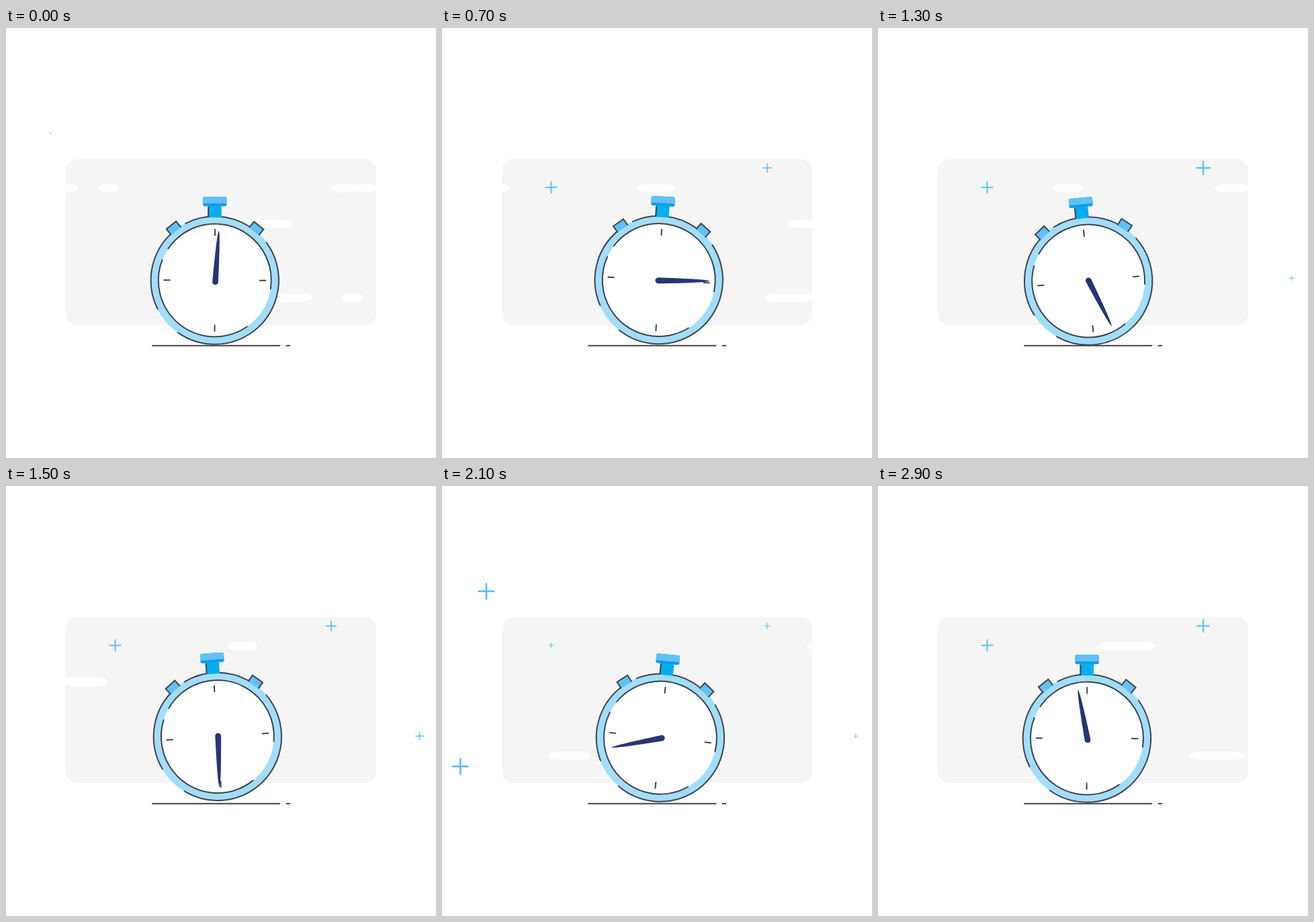
An HTML page with a canvas for the animation above (3000 ms loop, 640 px wide and 640 px high).

```html
<!DOCTYPE html>
<html lang="en">
<head>
<meta charset="utf-8">
<title>Stopwatch</title>
<style>
html, body { margin: 0; width: 100%; height: 100%; overflow: hidden; background: #fff; }
canvas { display: block; width: 640px; height: 640px; }
</style>
</head>
<body>
<canvas id="stage" width="640" height="640"></canvas>
<script>
const ctx = document.getElementById('stage').getContext('2d');
const LOOP = 3000, STEP = 100;
const INK = '#414347', SKY = '#61c0fb', PALE = '#a1ddfe', CYAN = '#04aeef', BLUE = '#0c9de8', NAVY = '#263576';
const RAD = Math.PI / 180;

// Rises smoothly from 0 to 1 between two times
function ease(t, from, to) {
  const u = Math.min(1, Math.max(0, (t - from) / (to - from)));
  return (1 - Math.cos(Math.PI * u)) / 2;
}

// The watch rocks from side to side, hops once, then settles
const SWING = 1720, SETTLE = SWING * 1.25;
function pose(t) {
  const tilt = 0.2 + 5.6 * (t < SETTLE ? Math.sin(2 * Math.PI * t / SWING) : 1 - ease(t, SETTLE, 2950));
  const drift = 8.5 * (ease(t, 0, 400) - ease(t, 1950, 2950));
  const hop = 34.6 * ease(250 - Math.abs(t - 1700), 0, 250);
  return { tilt, x: 310.6 + drift + 1.1 * tilt, y: 375.6 - 0.17 * tilt - hop, hand: 3.8 + 0.119 * t };
}

// Each twinkle swells and shrinks once per life, coming back after `every` ms
const pluses = [
  { x: 66, y: 156.7, start: -35, life: 720, every: 1845, swell: 13 },
  { x: 27.4, y: 417.3, start: 1675, life: 720, swell: 13 },
  { x: 484, y: 208.3, start: 385, life: 1500, every: 1500, swell: 11.5 },
  { x: 615.8, y: 372.3, start: 1060, life: 1250, swell: 7.5 },
  { x: 162.5, y: 237.2, start: 320, life: 1650, every: 1650, swell: 18, limit: 9.2 }
];

// Clouds by row: centre and width at time 0, then growth and speed per ms
const clouds = {
  238.6: [[74, 65, -0.012], [-170, 61, -0.012], [-935, 83, 0, 0.45], [153, 32, -0.11], [507, 46], [536, 31]],
  291.6: [[349, 154], [-446, 190, -0.05, 0.36]],
  401.2: [[516, 31], [420, 71], [274, 71], [-638, 10, 0.025, 0.394]]
};

function line(...points) {
  ctx.beginPath();
  for (let i = 0; i < points.length; i += 2) ctx.lineTo(points[i], points[i + 1]);
  ctx.stroke();
}

function box(x, y, w, h, radius, color) {
  ctx.fillStyle = color;
  ctx.beginPath();
  ctx.roundRect(x, y, w, h, radius);
  ctx.fill();
}

function disc(r, color) {
  ctx.fillStyle = color;
  ctx.beginPath();
  ctx.arc(0, 0, r, 0, 2 * Math.PI);
  ctx.fill();
}

// Angles run clockwise from twelve o'clock
function arc(r, from, to) {
  ctx.beginPath();
  ctx.arc(0, 0, r, (from - 90) * RAD, (to - 90) * RAD);
  ctx.stroke();
}

function pen(color, width) {
  ctx.strokeStyle = color;
  ctx.lineWidth = width;
  ctx.lineCap = 'round';
}

function drawCloud(y, t, [x, width, growth = 0, speed = 0.348]) {
  const w = width + growth * t;
  if (w > 0) box(x + speed * t - w / 2, y - 6, w, 12, { x: Math.min(w / 2, 13), y: 6 }, '#fff');
}

function drawPanel(t) {
  ctx.save();
  box(89, 195, 462, 247.5, 18, '#f5f5f5');
  ctx.clip();
  for (const y in clouds) {
    for (const cloud of clouds[y]) drawCloud(+y, t, cloud);
  }
  ctx.restore();
}

function drawPlus({ x, y, start, life, every = LOOP, swell, limit = swell }, t) {
  const age = (t - start) % every / life;
  if (age <= 0 || age >= 1) return;
  const size = Math.min(limit, swell * Math.sin(Math.PI * age)), r = size * 0.9;
  pen(SKY, size * 0.22);
  line(x - r, y, x + r, y);
  line(x, y - r, x, y + r);
}

function drawSideButton(angle) {
  ctx.save();
  ctx.rotate(angle * RAD);
  ctx.fillStyle = SKY;
  ctx.fillRect(-9.2, -104.6, 18.4, 11.4);
  line(-9.2, -94, -9.2, -104.6, 9.2, -104.6, 9.2, -94);
  ctx.restore();
}

function drawHand(angle) {
  ctx.save();
  ctx.translate(0.8, 0.8);
  ctx.rotate(angle * RAD);
  ctx.fillStyle = NAVY;
  ctx.beginPath();
  ctx.moveTo(-4.4, 1.6);
  ctx.quadraticCurveTo(-2.6, -72, 0, -74.5);
  ctx.quadraticCurveTo(2.6, -72, 4.4, 1.6);
  ctx.arc(0, 1.6, 4.4, 0, Math.PI);
  ctx.fill();
  ctx.restore();
}

function drawWatch({ x, y, tilt, hand }) {
  ctx.save();
  ctx.translate(x, y);
  ctx.rotate(tilt * RAD);
  disc(95.5, PALE);
  disc(84, '#fff');
  pen(INK, 2);
  arc(95.2, 53.5, 215);
  arc(95.2, 243.3, 316);
  arc(95.2, 332.6, 392);
  arc(84, 304, 458.5);
  arc(84, 145, 291);
  drawSideButton(-38.5);
  drawSideButton(38.5);

  ctx.fillStyle = CYAN;
  ctx.fillRect(-10, -112, 19.5, 18.5);
  line(-10, -109, -10, -94.5);
  box(-18, -124.5, 35.3, 14.2, 3, BLUE);
  box(-18, -124.5, 35.3, 10, [3, 3, 0, 0], SKY);

  for (let i = 0; i < 4; i++) {
    line(0, -75.5, 0, -67);
    ctx.rotate(Math.PI / 2);
  }
  drawHand(hand);
  ctx.restore();
}

function draw(now) {
  const t = Math.floor(now % LOOP / STEP) * STEP;
  ctx.fillStyle = '#fff';
  ctx.fillRect(0, 0, 640, 640);
  drawPanel(t);
  pen(INK, 2);
  line(218, 472.7, 407.5, 472.7);
  line(417.5, 472.7, 422.3, 472.7);
  drawWatch(pose(t));
  for (const plus of pluses) drawPlus(plus, t);
}

const begin = performance.now();
function tick() {
  draw(performance.now() - begin);
  requestAnimationFrame(tick);
}
tick();
</script>
</body>
</html>
```
